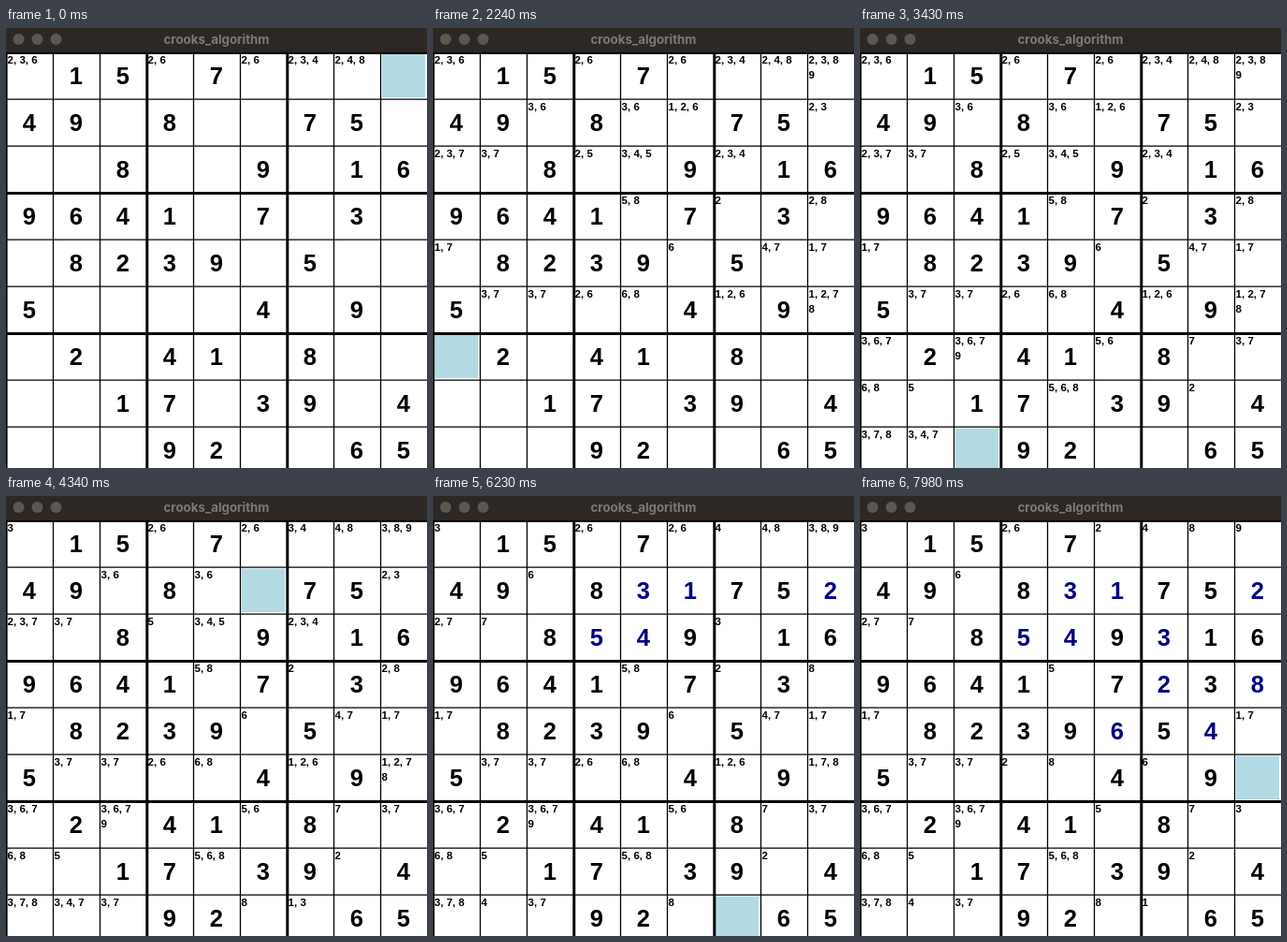
Write an HTML page that moves like this. It is 450 px wide and 470 px high and loops after 8000 ms.

```html
<!DOCTYPE html>
<html lang="en">
<head>
<meta charset="utf-8">
<title>crooks_algorithm</title>
<style>
  html, body { margin: 0; width: 100%; height: 100%; overflow: hidden; background: #fff; }
  svg { display: block; width: 450px; height: 470px; }
  text { font-family: "Liberation Sans", Arial, sans-serif; font-weight: 700; }
  .title { font: 700 13.3px Inter, sans-serif; fill: #7c7976; text-anchor: middle; }
  .digit { font-size: 25.5px; text-anchor: middle; }
  .digit.solved { fill: #000080; }
  .notes { font-size: 11.5px; }
  .mark { fill: #b3dae2; }
  .line { stroke: #000; }
</style>
</head>
<body>
<svg id="stage" viewBox="0 0 450 470">
  <rect width="450" height="470" fill="#fff"/>
  <g id="cells"></g>
  <g id="lines"></g>
  <rect width="450" height="26" fill="#2d2824"/>
  <g fill="#5b5753">
    <circle cx="13.5" cy="12" r="6"/>
    <circle cx="33.5" cy="12" r="6"/>
    <circle cx="53.5" cy="12" r="6"/>
  </g>
  <text class="title" x="225" y="16.5">crooks_algorithm</text>
</svg>
<script>
const LOOP = 8000, STEP = 70;
const puzzle = [
  '.15.7....', '49.8..75.', '..8..9.16',
  '9641.7.3.', '.8239.5..', '5....4.9.',
  '.2.41.8..', '..17.39.4', '...92..65'
];

// Each move is "row column candidates"; "=" enters the digit.
const deductions = ('003 0634 0748 08389 235 151 143 15=1 126 182 2445 14=3 ' +
  '388 58178 2634 18=2 244 23=5 263 24=4 814 2027 217 064 861 0889 26=3 ' +
  '5616 36=2 345 089 5817 38=8 474 052 655 532 548 45=6 078 47=4 683 566 581').split(' ');

// [step, move position]: whole part is the move, first half of it is the highlight.
const pace = [[0, .3], [12, 9.92], [19, 14.45], [32, 23.45], [49, 34.2],
  [62, 42.2], [89, 61.2], [114, 80.3]];
const DONE_AT_START = 5;

function add(parent, tag, attrs) {
  const el = document.createElementNS('http://www.w3.org/2000/svg', tag);
  for (const key in attrs) el.setAttribute(key, attrs[key]);
  return document.getElementById(parent).appendChild(el);
}

function candidates(row, col) {
  const used = new Set();
  for (let i = 0; i < 9; i++) {
    used.add(puzzle[row][i]).add(puzzle[i][col]);
    used.add(puzzle[row - row % 3 + Math.floor(i / 3)][col - col % 3 + i % 3]);
  }
  return [...'123456789'].filter(d => !used.has(d)).join('');
}

const cells = [], moves = [];
for (let row = 0; row < 9; row++) {
  for (let col = 0; col < 9; col++) {
    const x = 50 * col, y = 50 * row;
    const given = puzzle[row][col] !== '.';
    cells.push({
      given: given ? puzzle[row][col] : '',
      mark: add('cells', 'rect', { class: 'mark', x: x + 2, y: y + 27.5, width: 46, height: 46.5 }),
      digit: add('cells', 'text', { class: given ? 'digit' : 'digit solved', x: x + 24.8, y: y + 59.5 }),
      notes: add('cells', 'text', { class: 'notes', x: x + 1.6, y: y + 38 }),
      more: add('cells', 'text', { class: 'notes', x: x + 1.6, y: y + 54 })
    });
    if (!given) moves.push({ cell: row * 9 + col, value: candidates(row, col) });
  }
}
for (const d of deductions) moves.push({ cell: +d[0] * 9 + +d[1], value: d.slice(2) });

for (let i = 0; i < 10; i++) {
  const bold = i % 3 === 0, width = bold ? 3 : 1.3;
  const x = 50 * i + (bold ? .8 : .5), y = 50 * i + (bold ? 26.4 : 26.2);
  if (i < 9) add('lines', 'line', { class: 'line', x1: x, x2: x, y1: 26, y2: 470, 'stroke-width': i ? width : 1.6 });
  add('lines', 'line', { class: 'line', x1: 0, x2: 450, y1: y, y2: y, 'stroke-width': width });
}

function positionAt(step) {
  const i = Math.max(1, pace.findIndex(p => p[0] >= step));
  const [s0, p0] = pace[i - 1], [s1, p1] = pace[i];
  return p0 + (p1 - p0) * (step - s0) / (s1 - s0);
}

function draw(step) {
  const position = positionAt(step) + DONE_AT_START;
  const current = Math.floor(position), marking = position - current < .5;
  const values = cells.map(() => '');
  for (let i = 0; i <= current; i++) {
    values[moves[i].cell] = i === current && marking ? '' : moves[i].value;
  }
  cells.forEach((cell, i) => {
    const entered = values[i][0] === '=';
    const notes = entered ? '' : values[i];
    cell.mark.style.display = marking && moves[current].cell === i ? '' : 'none';
    cell.digit.textContent = entered ? values[i][1] : cell.given;
    cell.notes.textContent = [...notes.slice(0, 3)].join(', ');
    cell.more.textContent = [...notes.slice(3)].join(', ');
  });
}

let shown = -1;
const start = performance.now();
function tick() {
  const step = Math.floor((performance.now() - start) % LOOP / STEP);
  if (step !== shown) draw(shown = step);
  requestAnimationFrame(tick);
}
tick();
</script>
</body>
</html>
```
